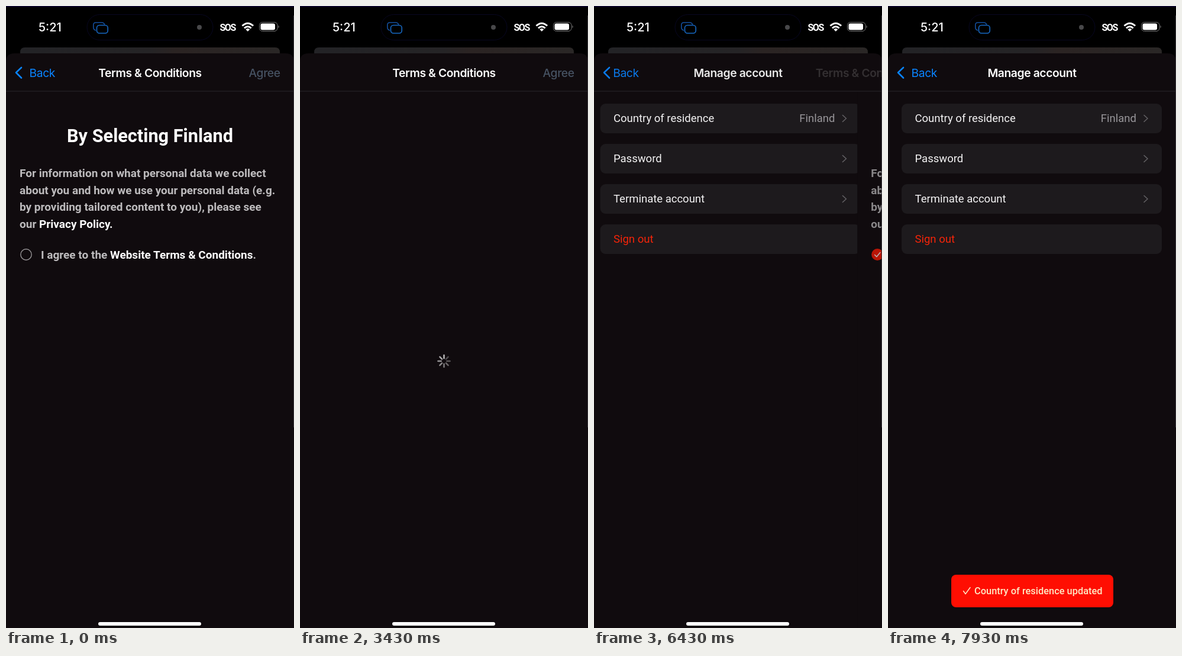
These frames come from a looping animation (487 px wide and 1051 px high, 9430 ms). An HTML page:

```html
<!DOCTYPE html>
<html lang="en">
<head>
<meta charset="utf-8">
<title>Terms &amp; Conditions</title>
<style>
  html, body { margin: 0; width: 100%; height: 100%; overflow: hidden; background: #000; }
  svg { display: block; width: 100vw; height: 100vh; }
  text { font-family: Roboto, sans-serif; white-space: pre; }
  .nav text { font: 400 19.3px Inter, sans-serif; letter-spacing: -.4px; }
  .nav .title { font-weight: 600; fill: #fff; text-anchor: middle; }
  .nav .action { font-weight: 500; }
  .blue { fill: #0a84ff; }
  .heading { font-size: 30.7px; font-weight: 700; fill: #fff; text-anchor: middle; }
  .copy { font-size: 19px; font-weight: 700; fill: #bdbbbd; }
  .copy tspan { fill: #fff; }
  .row { font-size: 18.5px; fill: #f4f3f4; }
  .line { fill: none; stroke-linecap: round; stroke-linejoin: round; }
</style>
</head>
<body>
<svg viewBox="0 0 487 1051" preserveAspectRatio="none">
  <defs>
    <linearGradient id="behind">
      <stop offset="0" stop-color="#232326"/>
      <stop offset=".5" stop-color="#252426"/>
      <stop offset=".6" stop-color="#2b2423"/>
      <stop offset="1" stop-color="#2a2726"/>
    </linearGradient>
    <clipPath id="body"><rect y="145" width="487" height="906"/></clipPath>
  </defs>

  <rect width="487" height="1051"/>
  <rect width="487" height="1.5" fill="#0b0430"/>

  <!-- status bar -->
  <text x="55" y="43" style="font:500 20px Inter,sans-serif" fill="#fff">5:21</text>
  <rect x="137" y="14.5" width="213" height="43" rx="21.5" stroke="#080722"/>
  <g class="line" stroke-width="1.6">
    <path d="M151.500 41Q147.800 40 147.800 36V32Q147.800 28 152 28H162Q165.500 28 166.500 31" stroke="#1450a0"/>
    <rect x="153.500" y="32.500" width="18.700" height="13.500" rx="4.500" stroke="#1769c4"/>
  </g>
  <circle cx="327" cy="36" r="4" fill="#48484a"/>
  <text x="361.500" y="42" font-size="16" font-weight="700" letter-spacing="-1.5" fill="#fff">SOS</text>
  <g class="line" stroke="#fff" stroke-width="3" style="stroke-linecap:butt">
    <path d="M399.500 33.500Q408.800 25 418.100 33.500"/>
    <path d="M403 37.500Q408.800 32 414.600 37.500"/>
  </g>
  <path d="M405.300 39.500Q408.800 36.500 412.300 39.500L408.800 43Z" fill="#fff"/>
  <rect x="428.500" y="27.500" width="30.500" height="15" rx="5" fill="none" stroke="#777"/>
  <rect x="430.500" y="29.500" width="24.500" height="11" rx="3" fill="#fff"/>
  <path d="M460.500 32.500Q463 35 460.500 37.500Z" fill="#777"/>

  <!-- sheet -->
  <path d="M24 82V78Q24 70 32 70H455Q463 70 463 78V82Z" fill="url(#behind)"/>
  <path d="M0 1051V94Q0 80 14 80H473Q487 80 487 94V1051Z" fill="#100b0e"/>

  <g clip-path="url(#body)">
    <g id="account"></g>
    <g id="terms">
      <rect y="145" width="490" height="906" fill="#100b0e"/>
      <g id="content">
        <text class="heading" x="243.500" y="230">By Selecting Finland</text>
        <text class="copy" x="23" y="289">For information on what personal data we collect</text>
        <text class="copy" x="23" y="317.500">about you and how we use your personal data (e.g.</text>
        <text class="copy" x="23" y="346">by providing tailored content to you), please see</text>
        <text class="copy" x="23" y="374.500">our <tspan>Privacy Policy.</tspan></text>
        <circle id="empty" cx="34" cy="420" r="9.200" fill="none" stroke="#969496" stroke-width="1.400"/>
        <g id="checked">
          <circle cx="34" cy="420" r="10" fill="#ff1a04"/>
          <path class="line" d="M29.500 420.500L32.700 423.700L38.700 416.500" stroke="#fff" stroke-width="1.500"/>
        </g>
        <text class="copy" x="59" y="427">I agree to the <tspan>Website Terms &amp; Conditions</tspan>.</text>
      </g>
    </g>
  </g>

  <g class="nav">
    <path d="M0 144H487" stroke="#29262a"/>
    <text id="termsTitle" class="title" x="243.500" y="119.500">Terms &amp; Conditions</text>
    <text id="accountTitle" class="title" x="243.500" y="119.500">Manage account</text>
    <g id="back">
      <path class="line" d="M26 104L17 112.500L26 121.500" stroke="#0a84ff" stroke-width="2.600"/>
      <text id="backLabel" class="blue" x="39.500" y="119.500">Back</text>
    </g>
    <text id="agree" class="action" x="410.500" y="119.500">Agree</text>
  </g>

  <g id="spinner" class="line" stroke="#fff" stroke-width="2.600"></g>

  <g id="toast">
    <rect x="107" y="961" width="274" height="55" rx="8" fill="#ff0e02"/>
    <path class="line" d="M127.500 988.500L131 993.500L139 982.500" stroke="#ffe9c4" stroke-width="1.500"/>
    <text x="146" y="994" font-size="16.400" font-weight="500" fill="#ffe9c4">Country of residence updated</text>
  </g>
  <rect x="156" y="1041" width="174" height="6" rx="3" fill="#fff"/>
  <path d="M486.500 16V712" stroke="#3a373b"/>
</svg>
<script>
const LOOP = 9430;
const TAP_CHECK = 1210, TAP_AGREE = 2500, POP = 6208, TOAST = 7431, TOAST_END = 7930;
const BLUE = [10, 132, 255], DIM_BLUE = [8, 61, 122], GREY = [70, 82, 98];
const el = id => document.getElementById(id);
const clamp = v => Math.max(0, Math.min(1, v));
const ramp = (t, from, to) => clamp((t - from) / (to - from));
const mix = (a, b, k) => `rgb(${a.map((v, i) => Math.round(v + (b[i] - v) * k))})`;
const settle = (ms, rate) => {
  const x = Math.max(0, ms) / 1000 * rate;
  return 1 - (1 + x) * Math.exp(-x);
};
const shift = (id, x, y = 0) => el(id).setAttribute('transform', `translate(${x} ${y})`);
const fade = (id, v) => { el(id).style.opacity = v; };

const rows = ['Country of residence', 'Password', 'Terminate account', 'Sign out'];
el('account').innerHTML = rows.map((label, i) => {
  const y = 165 + i * 68, last = i === rows.length - 1;
  return `<rect x="23" y="${y}" width="440" height="50" rx="9" fill="#1d1a1d"/>
    <text class="row" x="45.500" y="${y + 31}" ${last ? 'style="fill:#f42409"' : ''}>${label}</text>` +
    (last ? '' : `<path class="line" d="M433 ${y + 19.5}l6 5.500l-6 5.500" stroke="#626064" stroke-width="1.600"/>`);
}).join('') + '<text class="row" x="420" y="196" text-anchor="end" style="fill:#98969a">Finland</text>';

el('spinner').innerHTML = Array.from({ length: 8 }, (_, i) =>
  `<path d="M243.500 595.200V590" transform="rotate(${i * 45} 243.500 600)"/>`).join('');
const spokes = [...el('spinner').children];

function agreeColor(t) {
  if (t < TAP_CHECK) return mix(GREY, GREY, 0);
  if (t < TAP_AGREE) return mix(BLUE, BLUE, 0);
  return mix(DIM_BLUE, GREY, ramp(t, 2640, 3100));
}

function render(t) {
  const p = t >= 7000 ? 1 : settle(t - POP, 18.3);
  const popping = t >= POP;
  const leaving = ramp(t, TAP_AGREE - 30, TAP_AGREE + 100);

  // terms page
  const isChecked = t >= TAP_CHECK;
  el('empty').style.display = isChecked ? 'none' : '';
  el('checked').style.display = isChecked ? '' : 'none';
  fade('content', t < 6000 ? 1 - leaving : ramp(t, 6040, 6590));
  shift('terms', 487 * p);
  shift('account', -146 * (1 - p));

  // navigation bar
  fade('termsTitle', clamp((1 - p) * 1.7));
  shift('termsTitle', 239 * p);
  fade('accountTitle', p);
  fade('back', popping ? p : 1 - leaving);
  shift('backLabel', popping ? -85 * (1 - p) : 0);
  el('agree').style.fill = agreeColor(t);
  fade('agree', 1 - ramp(t, POP, POP + 200));

  // activity indicator
  fade('spinner', t < 6070 ? ramp(t, 2680, 2950) : 0);
  const phase = (t - 4430) / 125;
  spokes.forEach((spoke, i) => {
    const age = (((phase - i) % 8) + 8) % 8;
    const glow = age < 7 ? 1 - age / 7 : age - 7;
    spoke.style.strokeOpacity = .25 + .45 * glow;
  });

  const rise = t >= TOAST_END ? 1 : settle(t - TOAST, 14);
  fade('toast', rise);
  shift('toast', 0, 61 * (1 - rise));
}

const start = performance.now();
function tick() {
  render((performance.now() - start) % LOOP);
  requestAnimationFrame(tick);
}
tick();
</script>
</body>
</html>
```
